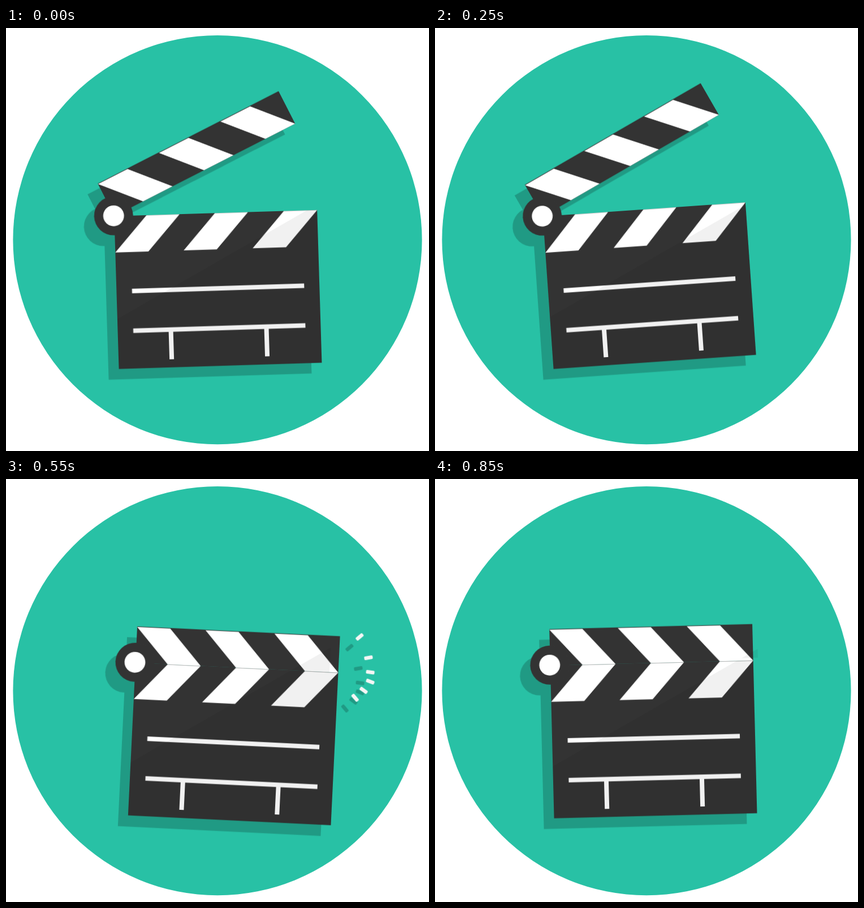
Recreate the animation shown at these times as an HTML page without scripts. Size 748 px wide and 748 px high, loop 1.6 s.

```html
<!DOCTYPE html>
<html lang="en">
<head>
<meta charset="utf-8">
<title>Clapperboard</title>
<style>
  html, body { margin: 0; width: 100%; height: 100%; overflow: hidden; background: #fff; }
  svg { display: block; width: 100%; height: 100%; }

  .board, .arm { transform-origin: 211px 327.3px; }
  .board { animation: swing 1.6s step-end infinite; }
  .arm { animation: clap 1.6s step-end infinite; }
  .shut { animation: swing 1.6s step-end infinite, shut 1.6s step-end infinite; }
  .shadow { filter: drop-shadow(-18px 19px 0 rgba(0, 0, 0, .2)); }
  .dark { fill: #333; }
  .white { fill: #fff; }
  .spark {
    x: -7.5px; y: -3.2px; width: 15px; height: 6.4px; rx: 1.6px;
    fill: #f4f6f5;
    animation: fly 1.6s step-end infinite;
  }

  /* one step = 50 ms = 3.125% */
  @keyframes swing {
    0%      { transform: translate(-20.7px, 4.8px) rotate(-1.76deg); }
    3.125%  { transform: translate(-36px, 8.4px) rotate(-5.8deg); }
    6.25%   { transform: translate(-46px, 10.7px) rotate(-8.8deg); }
    9.375%  { transform: translate(-48.2px, 11px) rotate(-9.47deg); }
    12.5%   { transform: translate(-38px, 9px) rotate(-7.3deg); }
    15.625% { transform: translate(-21.3px, 5.4px) rotate(-4deg); }
    18.75%  { transform: translate(-7px, 1.7px) rotate(-1.3deg); }
    21.875% { transform: none; }
    25%     { transform: translate(13.5px, -2.5px) rotate(2.2deg); }
    28.125% { transform: translate(16.7px, -3.2px) rotate(2.72deg); }
    31.25%  { transform: translate(18px, -3.4px) rotate(2.95deg); }
    34.375% { transform: translate(17px, -3.2px) rotate(2.78deg); }
    37.5%   { transform: translate(13.5px, -2.5px) rotate(2.2deg); }
    40.625% { transform: none; }
    43.75%  { transform: translate(-8.2px, 1.8px) rotate(-1.44deg); }
    46.875% { transform: translate(-10.4px, 2.3px) rotate(-1.85deg); }
    50%     { transform: translate(-10.4px, 2.3px) rotate(-1.85deg); }
    53.125%, 100% { transform: translate(-8.2px, 1.8px) rotate(-1.44deg); }
  }
  @keyframes clap {
    0%      { transform: rotate(-25.3deg); }
    3.125%  { transform: rotate(-26deg); }
    18.75%  { transform: rotate(-15deg); }
    21.875%, 100% { transform: none; }
  }
  @keyframes shut {
    0% { visibility: hidden; }
    21.875%, 100% { visibility: visible; }
  }
  @keyframes fly {
    0%      { visibility: hidden; transform: translateX(-20px); }
    25%     { visibility: visible; transform: translateX(-20px); }
    28.125% { visibility: visible; transform: none; }
    31.25%  { visibility: visible; transform: translateX(18px); }
    34.375% { visibility: visible; transform: translateX(37px); }
    37.5%   { visibility: visible; transform: translateX(67px) scale(.8); }
    40.625%, 100% { visibility: hidden; transform: translateX(67px); }
  }
</style>
</head>
<body>
<svg viewBox="0 0 748 748">
  <defs>
    <clipPath id="silhouette">
      <rect class="board" x="212" y="328" width="359" height="270.3"/>
      <rect class="shut" x="212" y="263.7" width="359" height="65"/>
    </clipPath>
  </defs>

  <circle cx="374" cy="374.6" r="361.6" fill="#28c1a5"/>

  <g class="shadow">
    <g transform="translate(597 303) rotate(-40)"><rect class="spark"/></g>
    <g transform="translate(604.5 322.5) rotate(-10)"><rect class="spark"/></g>
    <g transform="translate(607.5 336.5) rotate(8)"><rect class="spark"/></g>
    <g transform="translate(609.5 345) rotate(21)"><rect class="spark"/></g>
    <g transform="translate(602.5 352) rotate(36)"><rect class="spark"/></g>
    <g transform="translate(593.5 358.5) rotate(50)"><rect class="spark"/></g>

    <g class="board">
      <rect class="dark" x="212" y="328" width="359" height="270.3"/>
      <path class="white" d="M212 392.3h58.5l57-64h-58.5z M333 392.3h58.5l57-64h-58.5z M455 392.3h59l57-64h-59z"/>
      <path class="white" d="M239.5 457.3h304.5v8h-304.5z M239.5 527.5h304.5v8h-234v48.5h-8v-48.5h-62.5z M471 535h8v49h-8z"/>
      <g class="arm">
        <rect class="dark" x="212" y="263.7" width="359" height="64.6"/>
        <path class="white" d="M212 264.7h58.5l57 63.6h-58.5z M333 264.7h58.5l57 63.6h-58.5z M455 264.7h59l57 63.6h-59z"/>
      </g>
      <circle class="dark" cx="211" cy="327.3" r="34.5"/>
      <circle class="white" cx="211" cy="327.3" r="18.4"/>
    </g>
  </g>

  <!-- fixed shade, clipped to the moving board -->
  <g clip-path="url(#silhouette)">
    <path d="M100 570.3L700 226V700H100z" fill-opacity=".055"/>
  </g>
</svg>
</body>
</html>
```
